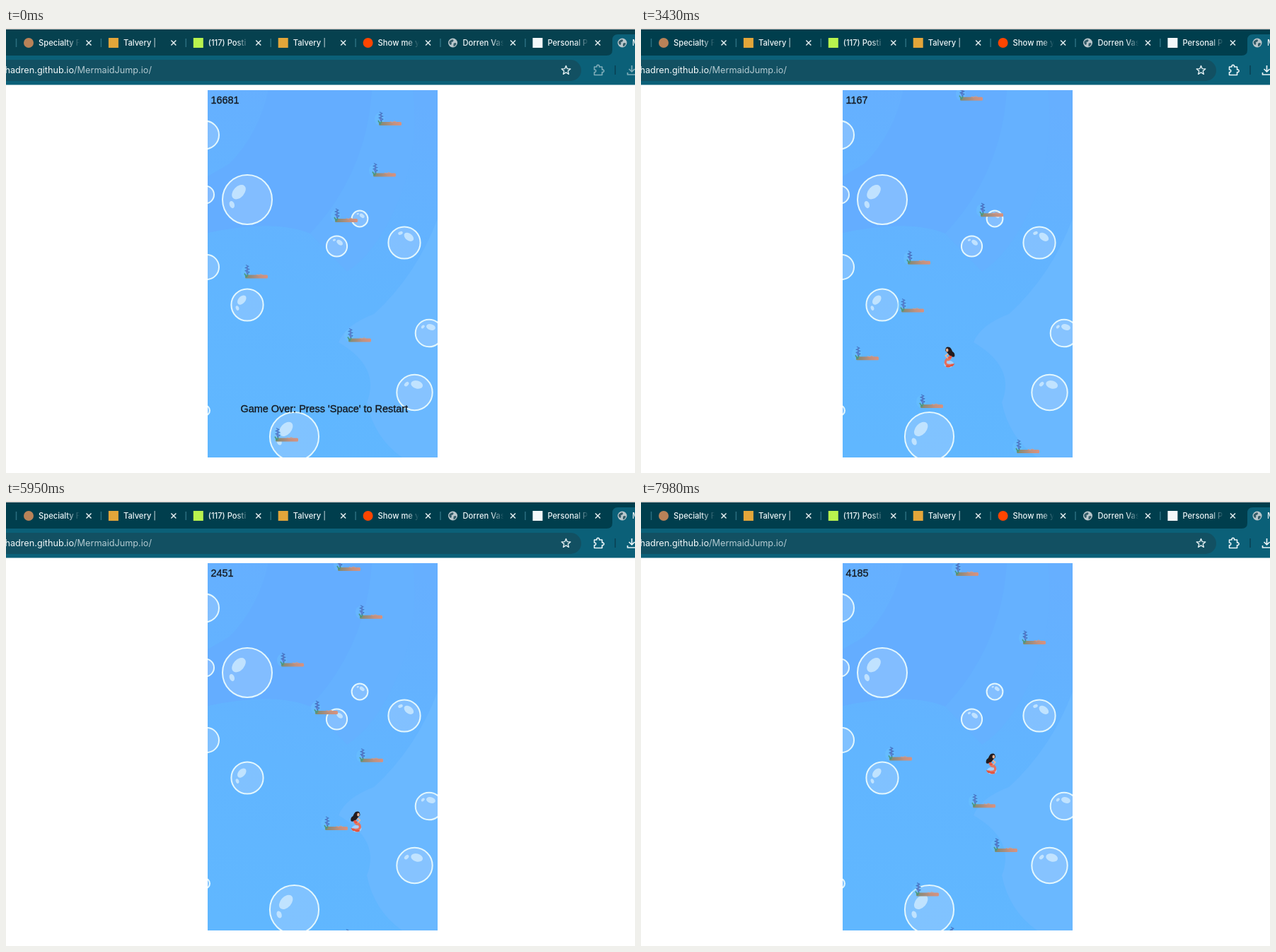
An HTML page with a canvas for the animation above (8 s loop, 889 px wide and 630 px high).

```html
<!DOCTYPE html>
<html lang="en">
<head>
<meta charset="utf-8">
<title>Mermaid Jump</title>
<style>
html, body { margin: 0; width: 100%; height: 100%; overflow: hidden; background: #fff; }
canvas { display: block; width: 889px; height: 630px; }
</style>
</head>
<body>
<canvas id="stage" width="889" height="630"></canvas>
<script>
const ctx = document.getElementById('stage').getContext('2d');
const LOOP = 8000, STEP = 70, FOCUS = 1400, RESTART = 1820;
const BOARD = { x: 285, y: 88, w: 325, h: 520 };
const UI = 'Inter, Roboto, sans-serif';
const GAME = '14.45px "Liberation Sans", Arial, sans-serif';
const INK = '#151a20';

// Key moments of the run; hops and steering are added by rule
const run = [
  { t: RESTART, scroll: 0, score: 0, x: 447, y: 518 },
  { t: 2380, scroll: 20, score: 181, x: 447, y: 531 },
  { t: 3430, scroll: 107, score: 1167, x: 443, y: 466 },
  { t: 4340, scroll: 256, score: 2030, x: 426, y: 418 },
  { t: 5950, scroll: 444, score: 2451, x: 508, y: 454 },
  { t: 6790, scroll: 578, score: 3098, x: 501, y: 410 },
  { t: LOOP - 20, scroll: 755, score: 4185, x: 501, y: 372 }
];
const HOP = { ms: 750, height: 70, phase: .2 };
const STEER = { ms: 1900, reach: 20 };

// Platforms from the lowest up; the board recycles them in rows of seven
const ledges = [459, 529, 393, 302, 366, 375, 478, 449, 499, 435, 387, 498, 467, 349, 538, 443];
const ROW = { size: 7, height: 600, first: 584, second: 487, gap: 67.7 };
const lastGame = [[525, 135], [517, 207.5], [463, 272], [336, 351.5], [482, 441.5], [379, 582.5]];

const bubbles = [[341, 243, 35], [467.5, 309, 14.6], [500, 270, 11.4], [563, 304, 22.6],
  [341, 392, 22.6], [598, 432, 19.3], [577.5, 516, 25.2], [407.5, 578.5, 34.6],
  [281, 151.5, 20], [281.5, 236, 12.5], [283.5, 338.5, 17.5], [281, 541.5, 7]];

const tabs = [['Specialty F', 'circle', '#b98258'], ['Talvery |', 'square', '#e3a63a'],
  ['(117) Posti', 'square', '#b9f34e'], ['Talvery |', 'square', '#e3a63a'],
  ['Show me y', 'circle', '#ff4500'], ['Dorren Vask', 'globe'], ['Personal P', 'square', '#f4f8fa']];

const mix = (a, b, p) => a + (b - a) * p;
const arc = p => 4 * p * (1 - p);
const climb = p => Math.floor(p) + Math.min(1, 2 * (p % 1));

// The view scrolls and the score grows only while the mermaid rises
function gameAt(t) {
  const i = Math.max(0, run.findLastIndex((k, n) => k.t <= t && n < run.length - 1));
  const a = run[i], b = run[i + 1];
  const u = (t - a.t) / (b.t - a.t);
  const hops = Math.round((b.t - a.t) / HOP.ms);
  const phase = HOP.phase + hops * u;
  const risen = (climb(phase) - climb(HOP.phase)) / hops;
  const steer = t / STEER.ms % 1;
  return {
    scroll: mix(a.scroll, b.scroll, risen),
    score: Math.round(mix(a.score, b.score, risen)),
    x: mix(a.x, b.x, u) - STEER.reach * Math.cos(steer * 2 * Math.PI),
    y: mix(a.y, b.y, u) - HOP.height * (arc(phase % 1) - arc(HOP.phase)),
    left: steer >= .5
  };
}

// Each landing pushes the platforms above it down a little further
function ledgeY(i, scroll) {
  const n = i % ROW.size;
  const base = n ? ROW.second - ROW.gap * (n - 1) : ROW.first;
  return base - ROW.height * Math.floor(i / ROW.size) + scroll + 5 * Math.min(i, scroll / 62);
}

function text(s, x, y, font, color, align = 'left') {
  ctx.font = font;
  ctx.fillStyle = color;
  ctx.textAlign = align;
  ctx.fillText(s, x, y);
}

function gameText(s, x, y) {
  text(s, x, y, GAME, INK);
  ctx.strokeStyle = INK;
  ctx.lineWidth = .35;
  ctx.strokeText(s, x, y);
}

function rect(x, y, w, h, color) {
  ctx.fillStyle = color;
  ctx.fillRect(x, y, w, h);
}

function round(x, y, w, h, r, color) {
  ctx.fillStyle = color;
  ctx.beginPath();
  ctx.roundRect(x, y, w, h, r);
  ctx.fill();
}

function oval(x, y, rx, ry, color, turn = 0) {
  ctx.fillStyle = color;
  ctx.beginPath();
  ctx.ellipse(x, y, rx, ry, turn, 0, 7);
  ctx.fill();
}

function shape(d, color) {
  ctx.fillStyle = color;
  ctx.fill(new Path2D(d));
}

function line(d, color, width = 1.5) {
  ctx.strokeStyle = color;
  ctx.lineWidth = width;
  ctx.stroke(new Path2D(d));
}

function globe(x, y) {
  oval(x, y, 6.5, 6.5, '#b9c6cb');
  shape(`M${x - 5} ${y - 2}q4 -4 6 -2q0 3 -3 3q1 3 -1 4q-3 -2 -2 -5zM${x + 1} ${y + 1}q3 -2 4 0q-1 4 -4 4z`, '#345c68');
}

function drawTab([label, kind, color], i) {
  const x = i * 119.9;
  line(`M${x + 14.5} 15v12`, '#2b6f80');
  if (kind === 'circle') oval(x + 32, 21, 7, 7, color);
  else if (kind === 'square') rect(x + 25, 14, 14, 14, color);
  else globe(x + 32, 21);
  const fade = ctx.createLinearGradient(x + 86, 0, x + 104, 0);
  fade.addColorStop(0, '#edf4f6');
  fade.addColorStop(1, 'rgba(237,244,246,0)');
  text(label, x + 46, 24.7, '500 11.2px ' + UI, fade);
  line(`M${x + 113.5} 17.5l7 7m0 -7l-7 7`, '#e4eef0');
}

function drawStar(x, y) {
  let d = 'M';
  for (let i = 0; i < 10; i++) {
    const r = i % 2 ? 2.9 : 6.6, a = i * Math.PI / 5 - Math.PI / 2;
    d += `${x + r * Math.cos(a)} ${y + r * Math.sin(a)} `;
  }
  line(d + 'z', '#e2eef1', 1.4);
}

function drawBrowser(active) {
  const icon = active ? '#e8f3f6' : '#7eacb8';
  const bar = '#0b6078';
  rect(0, 0, 889, 2, '#ddd8d4');
  rect(0, 2, 889, 38, active ? '#003e4d' : '#06414f');
  rect(0, 39, 889, 41.5, bar);
  shape('M849 39q8 0 8 -8V17q0 -8 8 -8H889V39z', bar);
  tabs.forEach(drawTab);
  globe(871, 21);
  text('Mermaid', 885, 24.7, '500 11.2px ' + UI, '#edf4f6');

  round(-20, 45, 833, 30, 15, '#125062');
  text('hadren.github.io', 96, 64, '12.7px ' + UI, '#f1f7f8', 'right');
  text('/MermaidJump.io/', 96, 64, '12.7px ' + UI, '#b3cad1');

  ctx.lineJoin = 'round';
  drawStar(791.5, 60);
  line('M831.5 55h3.5c-1 -3.5 4.5 -3.5 3.5 0h4v4c3.5 -1 3.5 4.5 0 3.5v4h-11v-4c3 .5 3 -4 0 -3.5z', icon, 1.6);
  line('M861 53v13', '#0a4152');
  line('M884.5 53v9m-4 -4l4 4l4 -4M878.5 63v3h12v-3', icon, 1.7);
}

function drawBubble([x, y, r]) {
  oval(x, y, r, r, 'rgba(173,210,255,.42)');
  ctx.strokeStyle = '#e3f7fd';
  ctx.lineWidth = 2;
  ctx.stroke();
  if (x < BOARD.x) return;
  const deg = x < 450 ? 222 : y < 350 ? 308 : 286;
  const spot = (turn, dist, rx, ry) => {
    const a = (deg + turn) * Math.PI / 180;
    oval(x + r * dist * Math.cos(a), y + r * dist * Math.sin(a), r * rx, r * ry, 'rgba(207,235,255,.8)', a + Math.PI / 2);
  };
  spot(0, .46, .34, .22);
  spot(-60, .65, .15, .1);
}

function drawWater() {
  const { x, y, w, h } = BOARD;
  const g = ctx.createLinearGradient(x + 200, y, x + 90, y + h);
  g.addColorStop(0, '#66afff');
  g.addColorStop(.55, '#61b5ff');
  g.addColorStop(1, '#60b7ff');
  rect(x, y, w, h, g);
  shape('M371 88H517Q510 205 430 291Q380 270 285 290V210L316 192Q357 150 371 88z', '#64adff');
  shape('M517 88H575Q586 180 548 260Q520 320 482 345L430 291Q510 205 517 88z', '#65b1ff');
  shape('M610 270Q580 350 520 405Q480 420 470 445Q530 480 510 530Q520 580 560 608H610z', '#6ab8ff');
  bubbles.forEach(drawBubble);
}

function drawPlatform(x, y) {
  ctx.save();
  ctx.translate(x, y);
  oval(3, -6, 7, 9, 'rgba(110,200,255,.35)');
  const wood = ctx.createLinearGradient(2, 0, 34, 0);
  wood.addColorStop(0, '#7f8a70');
  wood.addColorStop(.35, '#a08c7c');
  wood.addColorStop(.65, '#c2917f');
  wood.addColorStop(1, '#d8917f');
  round(2, -2, 32, 5, 1.5, wood);
  line('M18 -2.5l3 1l3 -1.5l3 1.5', '#d59a86', 1);
  line('M3 -16l4 2l-5 2l6 2l-6 2l6 2l-4 3', '#4678c8', 1.2);
  line('M5 -14v9M3 -7l3 4', '#5b6bb8', 1);
  line('M1 -4l3 5l2 -4', '#479a82', 1.6);
  ctx.restore();
}

function drawMermaid({ x, y, left }) {
  ctx.save();
  ctx.translate(x, y);
  if (left) ctx.scale(-1, 1);
  ctx.lineCap = 'round';
  oval(1, 10, 7, 5, 'rgba(205,225,255,.6)');
  line('M1 1Q8 5 5 10Q2 12 -3 11', '#e6705f', 3.2);
  shape('M-7 9Q-3 9 0 12Q4 10 6 13Q2 16 -2 13Q-5 14 -7 9z', '#e2553f');
  line('M-1 -5Q-3 0 2 3', '#dd7961', 4.5);
  line('M2 -5l4 3l-3 3', '#efb494', 1.6);
  shape('M0 -14Q6 -16 6 -9L3 -6Q1 -3 -1 -2Q-5 1 -7 -1Q-8 -6 -4 -8Q-2 -13 0 -14z', '#221c20');
  oval(3.5, -10, 1.8, 2.5, '#e9b193');
  line('M-2 -1Q-1 1 1 1', '#ef4d3d', 2);
  ctx.restore();
}

function drawGame(t) {
  if (t < RESTART) {
    lastGame.forEach(([x, y]) => drawPlatform(x, y));
    gameText('16681', 289.5, 106.8);
    gameText("Game Over: Press 'Space' to Restart", 331.5, 543.5);
    return;
  }
  const game = gameAt(t);
  ledges.forEach((x, i) => drawPlatform(x, ledgeY(i, game.scroll)));
  drawMermaid(game);
  gameText(String(game.score), 289.5, 106.8);
}

function draw(now) {
  const t = Math.floor((now % LOOP) / STEP) * STEP;
  rect(0, 0, 889, 630, '#fff');
  drawBrowser(t >= FOCUS);
  ctx.save();
  ctx.beginPath();
  ctx.rect(BOARD.x, BOARD.y, BOARD.w, BOARD.h);
  ctx.clip();
  drawWater();
  drawGame(t);
  ctx.restore();
}

const start = performance.now();
function tick() {
  draw(performance.now() - start);
  requestAnimationFrame(tick);
}
tick();
</script>
</body>
</html>
```
